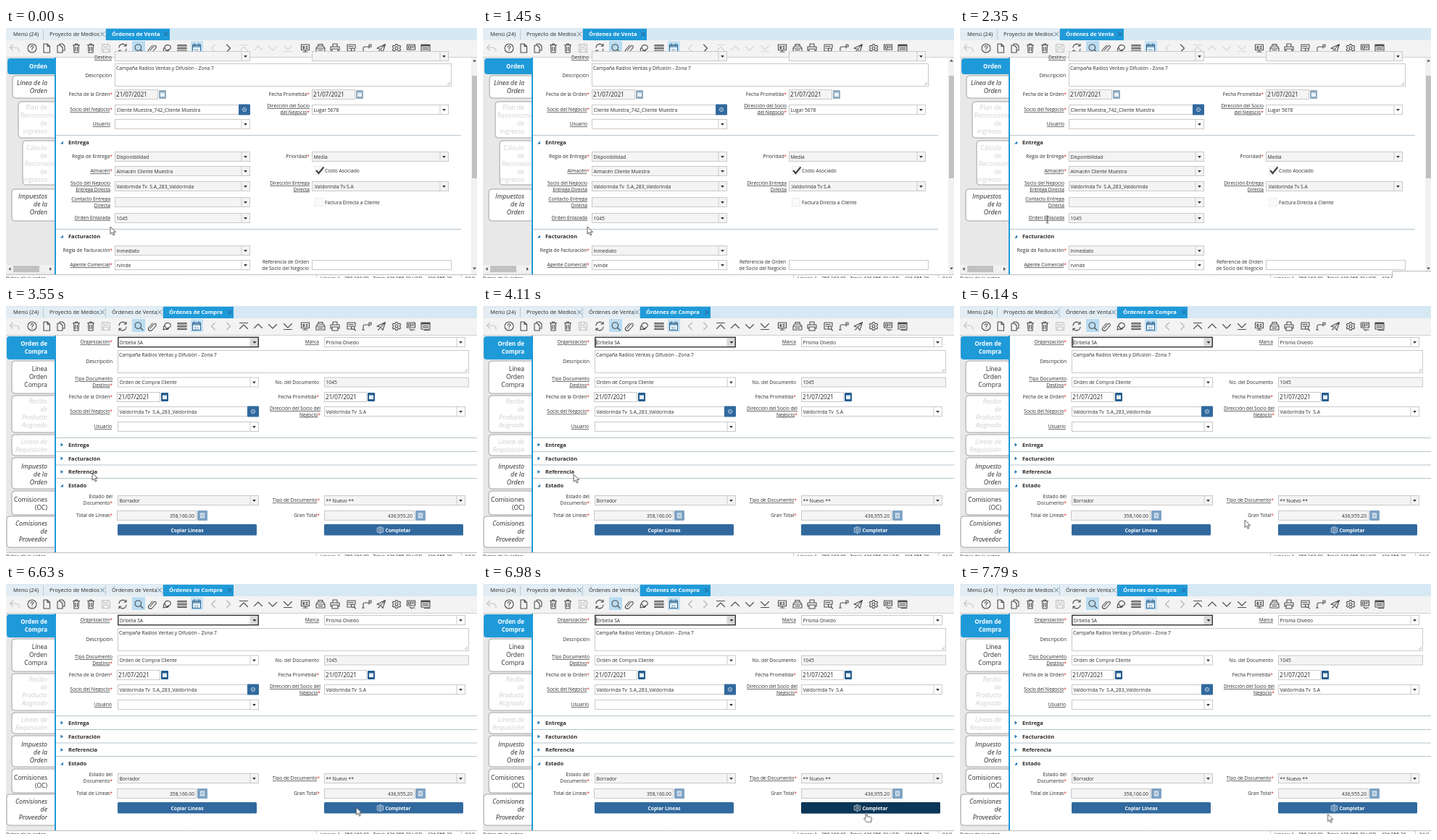
Write an HTML page that moves like this. It is 650 px wide and 346 px high and loops after 8 s.

```html
<!DOCTYPE html>
<html lang="es">
<head>
<meta charset="utf-8">
<title>Órdenes</title>
<style>
html, body { margin: 0; width: 100%; height: 100%; overflow: hidden; background: #fff; }
svg { display: block; width: 650px; height: 346px; }
text { font: 6.7px "Open Sans", "Noto Sans", sans-serif; fill: #2b2b2b; white-space: pre; }
.end { text-anchor: end; }
.mid { text-anchor: middle; }
.tab { font-size: 7.5px; }
.head { font-size: 7.5px; font-weight: 700; }
.white { fill: #fff; font-weight: 700; }
.date { font-size: 8.1px; fill: #222; }
.side { font-size: 8.5px; }
.sideOn { font-size: 8px; fill: #fff; font-weight: 700; }
.it { font-size: 8.8px; font-style: italic; }
.off { fill: #cfcfcf; }
.u { text-decoration: underline; }
.req { fill: #d33; }
.day { font-size: 6px; fill: #2f6a96; }
.icon { stroke-width: 1.1; stroke-linecap: round; stroke-linejoin: round; }
</style>
</head>
<body>
<svg id="stage" viewBox="0 0 650 346" xmlns="http://www.w3.org/2000/svg"></svg>
<script>
const BLUE = '#1f9ad9', NAVY = '#31699e', GREY = '#f4f4f4', INK = '#4c4c4c', LOOP = 8000;

const text = (x, y, s, cls = '') => `<text x="${x}" y="${y}" class="${cls}">${s}</text>`;
const rect = (x, y, w, h, fill, stroke = 'none', extra = '') =>
  `<rect x="${x}" y="${y}" width="${w}" height="${h}" fill="${fill}" stroke="${stroke}" ${extra}/>`;
const path = (d, fill, stroke = 'none', extra = '') =>
  `<path d="${d}" fill="${fill}" stroke="${stroke}" ${extra}/>`;
const group = (id, body) => `<g id="${id}">${body}</g>`;

// "_" in front marks a link, "*" at the end a required field, "|" a line break
function label(x, mid, s) {
  const link = s[0] === '_', req = s.endsWith('*');
  const lines = s.replace(/^_|\*$/g, '').split('|');
  return lines.map((line, i) => {
    const y = mid + 2.4 + (i - (lines.length - 1) / 2) * 8.4;
    const star = req && i === lines.length - 1 ? '<tspan class="req">*</tspan>' : '';
    return text(x, y, `<tspan class="${link ? 'u' : ''}">${line}</tspan>${star}`, 'end');
  }).join('');
}
const box = (x, mid, w, fill = '#fff') => rect(x + .5, mid - 6.5, w, 13, fill, '#c9c9c9');
function combo(x, mid, w, value, fill) {
  const a = x + w - 5.5;
  return box(x, mid, w, fill) + path(`M${x + w - 11} ${mid - 6.5}v13`, 'none', '#c9c9c9') +
    path(`M${a - 2.4} ${mid - 1}h4.8l-2.4 3z`, '#333') + text(x + 2.5, mid + 2.5, value);
}
function dateField(x, mid, w, fill, icon) {
  const i = x + w + 2;
  return box(x, mid, w, fill) + text(x + 2, mid + 3, '21/07/2021', 'date') +
    rect(i, mid - 6, 10, 12, icon, 'none', 'rx="1"') + rect(i + 2, mid - 2.5, 6, 5.5, '#e8f0f6');
}
const lookup = (x, mid, w, value) => box(x, mid, w) + text(x + 2.5, mid + 2.5, value) +
  rect(x + w, mid - 7.5, 16, 15, NAVY, 'none', 'rx="1"') +
  `<circle cx="${x + w + 8}" cy="${mid}" r="2.6" fill="none" stroke="#bcd3e6"/>` +
  path(`M${x + w + 8} ${mid - 1}v2`, 'none', '#bcd3e6');
function amount(x, mid, w, value) {
  const i = x + w + 2;
  return box(x, mid, w, GREY) + text(x + w - 2, mid + 2.5, value, 'end') +
    rect(i, mid - 7, 14, 14, '#7fa3c4', 'none', 'rx="1"') + rect(i + 4, mid - 3.5, 6, 7, '#dbe7f1') +
    path(`M${i + 5} ${mid - 1}h4m-4 2h4`, 'none', '#7fa3c4');
}
const area = (x, y, w, value) => rect(x + .5, y + .5, w, 31, '#fff', '#c9c9c9') + text(x + 2, y + 9, value) +
  path(`M${x + w - 5} ${y + 30}l4-4m-2 4l2-2`, 'none', '#999', 'stroke-width=".7"');
const section = (mid, s, open, right) =>
  path(`M69 ${mid - 9.5}H${right}`, 'none', '#b4c3cd') +
  path(open ? `M75 ${mid + 2.5}h4v-4z` : `M75.5 ${mid - 2.5}l3.5 2.5l-3.5 2.5z`, '#1d78b5') +
  text(86, mid + 2.6, s, 'head');

// words too long for the card start at its left edge and run under the page
function card(x, y, h, mid, s, cls) {
  const on = cls === 'sideOn';
  return path(`M68 ${y}H${x + 4}q-4 0-4 4v${h - 8}q0 4 4 4H68z`, on ? BLUE : '#fff', on ? 'none' : '#8f8f8f', 'stroke-width=".8"') +
    s.split('|').map((line, i) => line.length > 12
      ? text(x + 3, mid + 3 + i * 11, line, cls)
      : text(57, mid + 3 + i * 11, line, cls + ' end')).join('');
}
const sidebar = cards => rect(0, 41, 68, 300, '#e8e8e8') + cards.map(c => card(...c)).join('') +
  rect(68, 41, 582, 300, '#fff') + rect(67, 41, 2, 300, BLUE);

function tab(x, w, s, on, close = true) {
  const c = x + w - 5, ink = on ? '#24567f' : '#4a6f8a';
  return rect(x, 1, w, 16, on ? BLUE : '#e3edf3') + (on ? '' : path(`M${x + w - .5} 2v14`, 'none', '#b9cad6')) +
    text(x + (x ? 8 : 10), 11.2, s, 'tab' + (on ? ' white' : '')) +
    (close ? path(`M${c - 3} 5.5l6 6m0-6l-6 6`, 'none', ink, 'stroke-width=".9"') : '');
}

const trash = 'M-4.5-4.5h9M-1.5-4.5v-1.5h3v1.5M-3.5-4.5l.5 10.5h6l.5-10.5M-1.3-2v5.5M1.3-2v5.5';
const doc = 'M-4-6h5l3.5 3.5v8.500h-8.500zM1-6v3.5h3.5';
const gear = 'M-1-5.5h2l.5 1.5 1.5.7 1.5-.7 1.2 1.8-1 1.2v2l1 1.2-1.2 1.8-1.5-.7-1.5.7-.5 1.5h-2l-.5-1.5-1.5-.7-1.5.7-1.2-1.8 1-1.2v-2l-1-1.2 1.2-1.8 1.5.7 1.5-.7zM-2 0a2 2 0 1 0 4 0a2 2 0 1 0-4 0';
const icons = [
  [36, 'M-6 0a6 6 0 1 0 12 0a6 6 0 1 0-12 0M-1.7-1.5q0-2 1.7-2t1.7 1.7q0 1-1.7 2v1M0 3.2v.3'],
  [56, doc], [76, 'M-5-4h4l3 3v7h-7zM-2-4v-2h4l3 3v6h-3'], [97, trash], [117, trash],
  [161, 'M-5-1a5.2 5.2 0 0 1 9.5-2.5M5 1a5.2 5.2 0 0 1-9.5 2.5M5-6v3h-3M-5 6v-3h3'],
  [183, 'M-5-1a4.3 4.3 0 1 0 8.6 0a4.3 4.3 0 1 0-8.6 0M2.5 2l3.5 3.5'],
  [202, 'M-3 3l5-6q2-1.5 3 0t-.5 3l-5 5.5q-2.5 1.8-4.3 0t0-4l5-5.5'],
  [223, 'M-2.5 1.5a4.3 3.4 0 1 1 4 .5l-3 1.5zM-3.5-1q-3 1-2 3.5l-.5 2.5 2.5-1q3 1 5-1'],
  [243, 'M-6-4.5h12v1.5h-12zM-6-.7h12v1.5h-12zM-6 3h12v1.5h-12z'],
  [413, 'M-5.5-5h11v7.5h-11zM-3 5h6M0 2.5v2.5M-3-2.5v3h1.5v-3zM1-2.5h2M1-1h2M1 .5h2'],
  [434, 'M-6 0l2-3h8l2 3v5h-12zM-6 0h12M-3-3v-2.5h6v2.5M-3 2.5h6'],
  [454, 'M-3-2v-4h6v4M-6-2h12v5h-2M-4 3h-2v-5M-4 1h8v5h-8z'],
  [477, 'M-1 4h-5v-9h11v5M-4-2.5h6M-4 0h3M-.5 2a2.3 2.3 0 1 0 4.6 0a2.3 2.3 0 1 0-4.6 0M3.5 4l2 2'],
  [498, 'M-5 5v-5q0-2 2-2h6M-6.500 5h3M3-5v5M3-5h3v3h-3'],
  [518, 'M-6 0l11.5-5.5-3.5 11-3-4zM-1 1.5l6.5-7M-4.5 5l2.5-2'],
  [539, gear],
  [559, 'M-5.5-5h11v7h-11zM-3.5-3h3v3h-3zM1-3h3M1-1h3M1 5h4M-2 4l3 2'],
  [579, 'M-6-5h12v9h-12zM-6-4h12M-6-3h12M-4-.5h8M-4 1.500h8M-2 5.500h8']
];
const shape = (x, d, ink, fill = 'none') => path(d, fill, ink, `class="icon" transform="translate(${x} 28)"`);
const jumps = [[328, 'M-5.5-4.5h11M-5.5 3.5l5.5-5.5 5.5 5.5'], [348, 'M-5.5 2.5l5.5-5.5 5.5 5.5'],
  [368, 'M-5.5-2.5l5.5 5.5 5.5-5.5'], [389, 'M-5.5 4.5h11M-5.5-3.5l5.5 5.5 5.5-5.5']];
const nav = (back, next, jump) => shape(286, 'M2.5-5l-5 5 5 5', back) + shape(307, 'M-2.5-5l5 5-5 5', next) +
  jumps.map(([x, d]) => shape(x, d, jump)).join('');

const chrome = rect(0, 0, 650, 17, '#d6e8f3') + rect(0, 17, 650, 24, '#f3f3f3') +
  rect(0, 40, 650, 1, '#cfcfcf') + rect(174, 18, 18, 18, '#b9dcf2', 'none', 'rx="1"') +
  rect(255, 18, 17, 18, '#c6e1f2', 'none', 'rx="1"') +
  shape(12, 'M-2.5-5l-4 4 4 4M-6-1h7q5 0 5 5.5', '#c4c4c4') +
  shape(138, 'M-5.5-5.5h9l2 2v9h-11zM-3-5.5v4h5v-4M-3.5 5.5v-4.5h7v4.5', '#c4c4c4') +
  icons.map(([x, d]) => shape(x, d, INK)).join('') +
  shape(263, 'M-5.5-5h11v10.5h-11zM-5.5-3.5h11M-5.5-2h11M-3-6.500v2M3-6.500v2', '#2f6a96', '#eaf4fa') + text(263, 32.500, '31', 'mid day') +
  tab(0, 52, 'Menú (24)', false, false) + tab(52, 86, 'Proyecto de Medios');

const status = rect(0, 341, 650, 5, '#fff') + path('M0 341.5H650', 'none', '#bdbdbd') +
  path('M428.5 342v4M628.5 342v4', 'none', '#ccc') + text(0, 349, 'Datos de la orden') +
  text(434, 349, 'Líneas: 1 - 358,160.00 - Total: 436,955.20 USD = 436,955.20') + text(634, 349, '04/1');

const scrollbars = rect(642, 41, 8, 300, '#f1f1f1') + rect(643, 66, 7, 142, '#c1c1c1') +
  path('M644 46.5h5l-2.500-3zM644 331.500h5l-2.500 3z', '#555') +
  rect(0, 328, 66, 11, '#f1f1f1') + rect(10, 329, 36, 9, '#c1c1c1') +
  path('M6.500 331v5l-3-2.500zM60 331v5l3-2.500z', '#555');

const project = 'Campaña Radios Ventas y Difusión - Zona 7';
const vendor = 'Valdorinda Tv  S.A';

const sales = tab(138, 88, 'Órdenes de Venta', true) + nav('#d6d6d6', INK, '#d6d6d6') +
  sidebar([
    [2, 42, 22, 53, 'Orden', 'sideOn'],
    [9, 66, 31, 76, 'Línea de la|Orden', 'it'],
    [17, 102, 50, 110, 'Plan de|Reconocimiento|de|ingresos', 'side off'],
    [23, 156, 61, 166, 'Cálculo|de|Reconocimiento|de|ingresos', 'side off'],
    [8, 223, 44, 233, 'Impuestos|de la|Orden', 'it']
  ]) +
  label(146, 41, '_Destino') + combo(150, 39, 186, '', GREY) + combo(422, 39, 188, '', GREY) +
  label(146, 65.5, 'Descripción') + area(150, 49, 464, project) +
  label(147, 92, 'Fecha de la Orden*') + dateField(150, 92, 59, GREY, '#8fabc0') +
  label(419, 92, 'Fecha Prometida*') + dateField(422, 92, 59, GREY, '#8fabc0') +
  label(147, 113, '_Socio del Negocio*') + lookup(150, 113, 171, 'Cliente Muestra_742_Cliente Muestra') +
  label(419, 112, '_Dirección del Socio|del Negocio*') + combo(422, 113, 188, 'Lugar 5678') +
  label(144, 133, '_Usuario') + combo(150, 133, 186, '') +
  section(158, 'Entrega', true, 628) +
  label(147, 178, 'Regla de Entrega*') + combo(150, 178, 186, 'Disponibilidad', GREY) +
  label(419, 178, 'Prioridad*') + combo(422, 178, 188, 'Media', GREY) +
  label(147, 198, '_Almacén*') + combo(150, 198, 186, 'Almacén Cliente Muestra', GREY) +
  rect(426.5, 191.5, 11, 11, '#fafafa', '#ececec') + path('M428 197l3.500 4 7-8.500', 'none', '#444', 'stroke-width="2.2"') +
  text(440, 200, 'Costo Asociado') +
  label(144, 219, '_Socio del Negocio|Entrega Directa') + combo(150, 219, 186, vendor + '_283_Valdorinda', GREY) +
  label(419, 219, '_Dirección Entrega|Directa') + combo(422, 219, 188, '.Valdorinda Tv S.A', GREY) +
  label(144, 241, '_Contacto Entrega|Directa') + combo(150, 241, 186, '', GREY) +
  rect(426.5, 235.5, 11, 11, '#fafafa', '#ececec') + text(440, 243.5, 'Factura Directa a Cliente') +
  label(144, 262.5, '_Orden Enlazada') + combo(150, 263, 186, '1045', GREY) +
  section(288, 'Facturación', true, 628) +
  label(147, 308, 'Regla de Facturación*') + combo(150, 308, 186, 'Inmediato', GREY) +
  label(147, 328, '_Agente Comercial*') + combo(150, 328, 186, 'rvinde') +
  label(418, 328, 'Referencia de Orden|de Socio del Negocio') + box(422, 328, 192) +
  scrollbars;

const button = (x, w, s, cx) => rect(x, 302, w, 15.5, NAVY, 'none', 'rx="1.5"') + text(cx, 312.6, s, 'white mid');
const purchase = tab(138, 79, 'Órdenes de Venta') + tab(217, 97, 'Órdenes de Compra', true) + nav('#b5b5b5', '#b5b5b5', INK) +
  sidebar([
    [1, 42, 32, 52, 'Orden de|Compra', 'sideOn'],
    [8, 76, 45, 87, 'Línea|Orden|Compra', 'side'],
    [8, 124, 51, 132, 'Recibo|de|Producto|Asignado', 'it off'],
    [8, 178, 29, 188, 'Líneas de|Requisición', 'it off'],
    [8, 210, 43, 222, 'Impuesto|de la|Orden', 'it'],
    [8, 256, 33, 268, 'Comisiones|(OC)', 'side'],
    [1, 291, 43, 301, 'Comisiones|de|Proveedor', 'it']
  ]) +
  label(147, 50, '_Organización*') + combo(154, 50, 194, 'Orbelia SA') +
  rect(337.5, 43.5, 11, 13, '#d9d9d9') + path('M340.5 49h5l-2.500 3z', '#333') +
  rect(154.8, 43.3, 193.5, 13.4, 'none', '#333', 'stroke-width="1.4"') +
  label(432, 50, '_Marca') + combo(439, 50, 194, 'Prisma Olvedo') +
  label(147, 77, 'Descripción') + area(154, 61, 484, project) +
  label(147, 105, '_Tipo Documento|Destino*') + combo(154, 105.5, 194, 'Orden de Compra Cliente') +
  label(432, 105.5, 'No. del Documento') + box(439, 105.5, 199, GREY) + text(441.5, 108, '1045') +
  label(147, 126, 'Fecha de la Orden*') + dateField(153, 126, 59, '#fff', '#255d90') +
  label(432, 126, 'Fecha Prometida*') + dateField(439, 126, 58, '#fff', '#255d90') +
  label(147, 146, '_Socio del Negocio*') + lookup(154, 146, 179, vendor + '_283_Valdorinda') +
  label(434, 146, '_Dirección del Socio del|Negocio*') + combo(439, 146, 194, vendor) +
  label(146, 167, '_Usuario') + combo(154, 167, 194, '') +
  section(192, 'Entrega', false, 650) + section(211, 'Facturación', false, 650) +
  section(229.5, 'Referencia', false, 650) + section(248, 'Estado', true, 650) +
  label(147, 268, 'Estado del|Documento*') + combo(154, 269, 194, 'Borrador', GREY) +
  label(433, 269, '_Tipo de Documento*') + combo(439, 269, 194, '** Nuevo **', GREY) +
  label(147, 290, 'Total de Líneas*') + amount(153, 290, 109, '358,160.00') +
  label(433, 290, 'Gran Total*') + amount(439, 290, 124, '436,955.20') +
  button(154, 192, 'Copiar Líneas', 250) +
  button(439, 192, 'Completar', 541) +
  group('hover', rect(439, 302, 192, 15.5, '#0b3657', 'none', 'rx="1.5"') + text(541, 312.6, 'Completar', 'white mid')) +
  path(gear, 'none', '#fff', 'transform="translate(516.5 310) scale(.8)" stroke-width="1.1"') +
  group('caret', rect(155.7, 45.5, .8, 9, '#222'));

const pointer =
  group('arrow', path('M0 0v10.2l2.4-2.2 1.7 3.9 1.8-.8-1.7-3.8h3.3z', '#fff', '#333', 'stroke-width=".8"')) +
  group('beam', path('M-1.5-4.5q1.5 0 1.5 1v8q0 1-1.5 1M1.5-4.5q-1.5 0-1.5 1M1.5 5.5q-1.5 0-1.5-1', 'none', '#222', 'stroke-width=".9"')) +
  group('hand', path('M-1 7V1q0-1 1-1t1 1v4l5 1q2 .5 1.5 2.5l-1 4.5H.5L-3.500 8.500q.5-2 2.5-.3z', '#fff', '#333', 'stroke-width=".8"'));

document.getElementById('stage').innerHTML = chrome + group('sales', sales) + group('purchase', purchase) +
  status + group('tip', rect(596.5, 336.5, 60, 12, '#fff', '#bbb')) + group('pointer', pointer);

const animate = (id, frames) => document.getElementById(id).animate(frames, { duration: LOOP, iterations: Infinity });

// visible during each [from, to) span; one keyframe per distinct time
function show(id, ...spans) {
  const marks = new Map([[0, 0], ...spans.flatMap(([a, b]) => [[a, 1], [b, 0]]), [LOOP, 0]]);
  animate(id, [...marks].map(([t, v]) => ({ offset: t / LOOP, opacity: v, easing: 'step-end' }))
    .sort((a, b) => a.offset - b.offset));
}
show('sales', [0, 2500]);
show('purchase', [2500, LOOP]);
show('tip', [2340, 2500]);
show('hover', [6860, 7600]);
show('beam', [1990, 3290]);
show('hand', [6970, 7600]);
show('arrow', [0, 1990], [3290, 6970], [7600, LOOP]);
show('caret', ...[0, 1, 2, 3, 4].map(i => [2600 + i * 1060, 3130 + i * 1060]));

const route = [
  [0, 144, 275], [1700, 144, 275], [2000, 120.5, 264.5], [3110, 120.5, 264.5], [3290, 121, 258],
  [3550, 119, 231], [3960, 119, 231], [4180, 128, 234], [4380, 140, 236], [4790, 281, 241],
  [5130, 405, 238], [5300, 433, 236], [5600, 420, 270], [5940, 391, 296], [6130, 391, 296],
  [6500, 462, 306], [6910, 529, 316.5], [7380, 529, 316.5], [7600, 516, 318], [7780, 507.5, 318.5], [LOOP, 507.5, 318.5]
];
animate('pointer', route.map(([t, x, y]) => ({ offset: t / LOOP, transform: `translate(${x}px, ${y}px)` })));
</script>
</body>
</html>
```
